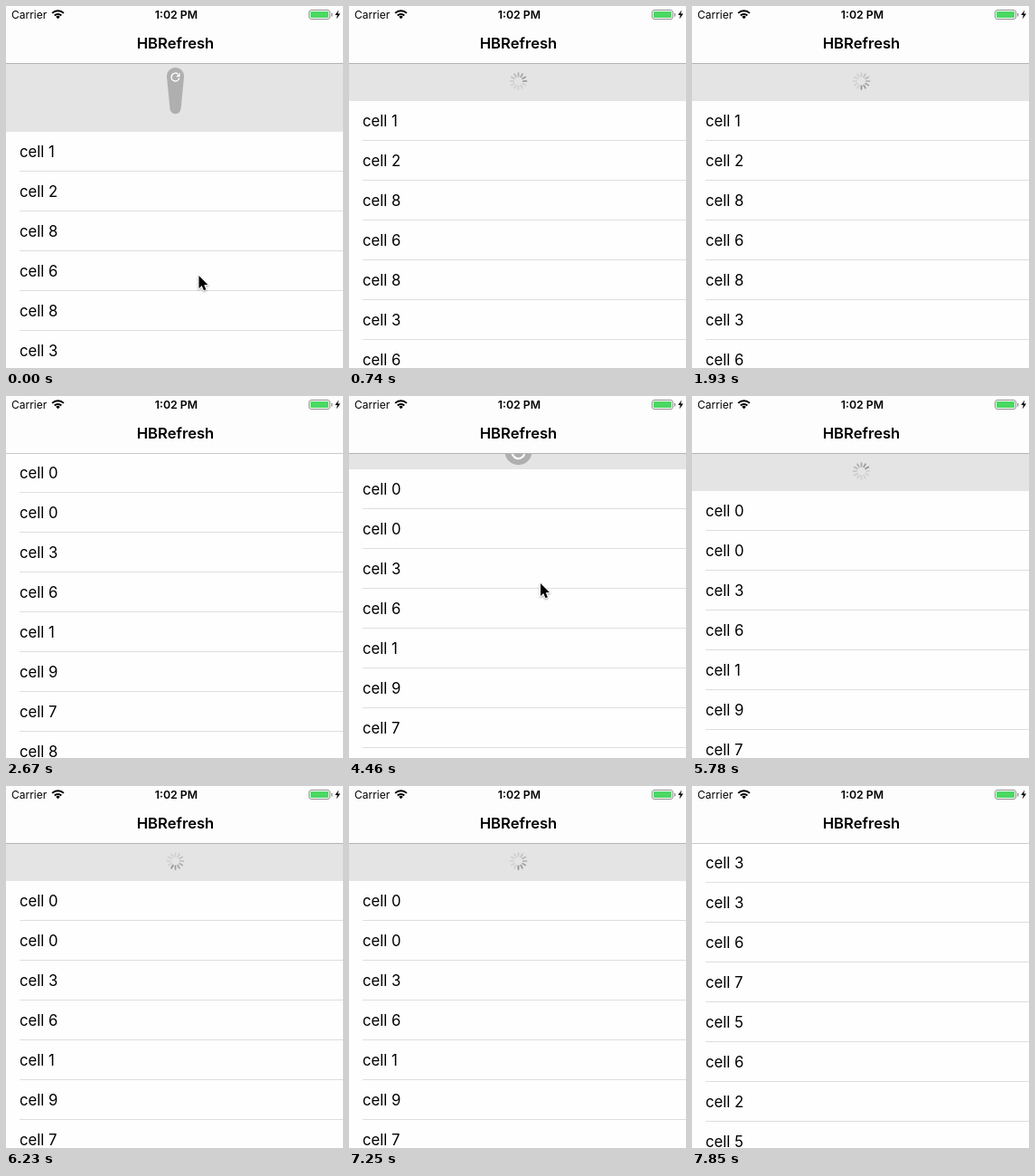
Write an HTML page with a canvas that moves like this. It is 373 px wide and 400 px high and loops after 8600 ms.

```html
<!DOCTYPE html>
<html lang="en">
<head>
<meta charset="utf-8">
<title>Pull to refresh</title>
<style>
  html, body { margin: 0; width: 100%; height: 100%; overflow: hidden; background: #fefefe; }
  canvas { display: block; }
</style>
</head>
<body>
<canvas id="stage" width="373" height="400"></canvas>
<script>
const W = 373, H = 400, TOP = 63, ROW = 44, CX = 187.5;
const LOOP = 8600, STEP = 148.3;
const SECOND = 5190, OPEN = 42;        // second release, height while loading
const FONT = 'Inter, "Liberation Sans", sans-serif';
const LISTS = ['12868363', '00361978', '33675625'];
const c = document.getElementById('stage').getContext('2d');

const clamp = v => Math.max(0, Math.min(1, v));
const smooth = v => v * v * (3 - 2 * v);

function rect(color, x, y, w, h) {
  c.fillStyle = color;
  c.fillRect(x, y, w, h);
}

function text(str, x, y, size, weight = 400, align = 'left') {
  c.font = `${weight} ${size}px ${FONT}`;
  c.textAlign = align;
  c.fillStyle = '#000';
  c.fillText(str, x, y);
}

function poly(points, color) {
  c.beginPath();
  points.forEach(([x, y]) => c.lineTo(x, y));
  c.closePath();
  c.fillStyle = color;
  c.fill();
}

// Height of the gap for a finger dragged by dy, with rubber-band resistance
function rubber(dy) {
  const a = Math.max(0, dy) * 0.55;
  return a / (1 + a / 700);
}

// Gap, list, cursor and spinner after a release at rel = 0
function refreshing(rel, start, closeAt, x, y, list) {
  const close = smooth(clamp((rel - closeAt) / 300));
  const settle = 1 - clamp((rel - 60) / 400);
  return {
    gap: rel < 60 ? start : (OPEN + (start - OPEN) * settle ** 3) * (1 - close),
    list: rel < closeAt ? list : list + 1,
    cursor: [x, y + 900 * (rel / 1000) ** 2],
    spin: rel < 100 ? 0 : 1 - close,
    rel
  };
}

function state(t) {
  if (t < 3200) return refreshing(t, 75.5, 2290, 213.5, 298, 0);
  if (t >= SECOND - 20) return refreshing(Math.max(0, t - SECOND), 76, 2250, 207, 328, 1);
  const start = 4149;
  if (t < start) {
    const p = 1 - (1 - clamp((t - 3240) / 765)) ** 2;
    return { gap: 0, list: 1, spin: 0, cursor: [208 + 4 * p, 342 - 184 * p] };
  }
  const y = 158 + (t - start) * 0.1633;
  const x = 212 - 5 * clamp((t - 4450) / 740);
  return { gap: rubber(y - 173), list: 1, spin: 0, cursor: [x, y] };
}

// Circle that follows the list, then stretches into a drop
function drop(gap) {
  const pull = Math.max(0, gap - 40);
  const r1 = 15 - pull * 0.153, r2 = 15 - pull * 0.25;
  const y = pull ? TOP + 5 + r1 : TOP + gap - 20;
  c.fillStyle = '#afafaf';
  c.beginPath();
  c.arc(CX, y, r1, Math.PI, 0);
  c.arc(CX, y + pull, r2, 0, Math.PI);
  c.closePath();
  c.fill();

  const r = r1 * 0.46;
  c.save();
  c.translate(CX, y + 1);
  c.strokeStyle = '#fff';
  c.lineWidth = r1 * 0.15;
  c.beginPath();
  c.arc(0, 0, r, 0.25, 5.4);
  c.stroke();
  poly([[r * 1.15, -r * 1.1], [r * 1.15, -r * 0.1], [r * 0.15, -r * 0.1]], '#fff');
  c.restore();
}

function spinner(rel, scale) {
  const lead = Math.floor(rel * 0.012) - 5;
  c.save();
  c.translate(CX, TOP + 20);
  c.scale(scale, scale);
  c.lineWidth = 1.7;
  c.lineCap = 'round';
  for (let i = 0; i < 12; i++) {
    const age = ((lead - i) % 12 + 12) % 12;
    const a = i * Math.PI / 6;
    c.strokeStyle = `rgba(130,130,130,${Math.max(0.2, 0.85 - age * 0.1) * scale})`;
    c.beginPath();
    c.moveTo(5.3 * Math.sin(a), -5.3 * Math.cos(a));
    c.lineTo(9 * Math.sin(a), -9 * Math.cos(a));
    c.stroke();
  }
  c.restore();
}

function cursor(x, y) {
  c.save();
  c.translate(x, y);
  c.beginPath();
  [[0, 0], [0, 14], [3.2, 11], [5.5, 16.2], [7.9, 15.2], [5.7, 10.2], [10, 10]]
    .forEach(([px, py]) => c.lineTo(px, py));
  c.closePath();
  c.shadowColor = 'rgba(0,0,0,.35)';
  c.shadowBlur = 2;
  c.shadowOffsetY = 1;
  c.strokeStyle = '#fff';
  c.lineWidth = 2;
  c.lineJoin = 'round';
  c.stroke();
  c.shadowColor = 'transparent';
  c.fillStyle = '#000';
  c.fill();
  c.restore();
}

function header(open) {
  rect('#fdfdfd', 0, 0, W, TOP);
  rect(open ? '#b4b4b4' : '#cacaca', 0, TOP, W, 1);
  text('Carrier', 6, 14, 12);
  text('1:02 PM', 188.5, 14, 12.3, 600, 'center');
  text('HBRefresh', CX, 47, 16.6, 600, 'center');

  c.strokeStyle = '#000';
  c.lineWidth = 2;
  for (const r of [1.6, 5.3, 9]) {
    c.lineWidth = r < 2 ? 3.2 : 2;
    c.beginPath();
    c.arc(57.5, 14.2, r, -Math.PI * 0.75, -Math.PI * 0.25);
    c.stroke();
  }

  c.strokeStyle = '#8f8f8f';
  c.lineWidth = 1;
  c.beginPath();
  c.roundRect(335.5, 4.5, 23, 10, 2.5);
  c.stroke();
  c.fillStyle = '#4bd863';
  c.beginPath();
  c.roundRect(337, 6, 20, 7, 1);
  c.fill();
  rect('#8f8f8f', 360, 8, 1.3, 3.5);
  poly([[368.2, 4.6], [364.2, 10], [366.8, 10], [365.6, 14.4], [370, 8.6], [367.2, 8.6]], '#000');
}

function draw(t) {
  const s = state(t), open = s.gap > 0.5, y0 = TOP + s.gap;
  rect('#fefefe', 0, 0, W, H);
  if (open) {
    const edge = Math.round(y0);
    c.save();
    c.beginPath();
    c.rect(0, TOP, W, edge - TOP);
    c.clip();
    rect('#e4e4e4', 0, TOP, W, edge - TOP);
    if (s.spin) spinner(s.rel, s.spin);
    else drop(s.gap);
    c.restore();
  }
  [...LISTS[s.list]].forEach((digit, i) => {
    const y = y0 + i * ROW;
    text('cell ' + digit, 15, y + 28, 16.7);
    rect('#dedede', 15, Math.round(y) + 43, W - 15, 1);
  });
  header(open);
  cursor(...s.cursor);
}

function tick(now) {
  const t = now % LOOP;
  draw(Math.floor((t + 12) / STEP) * STEP);
  requestAnimationFrame(tick);
}
requestAnimationFrame(tick);
</script>
</body>
</html>
```
